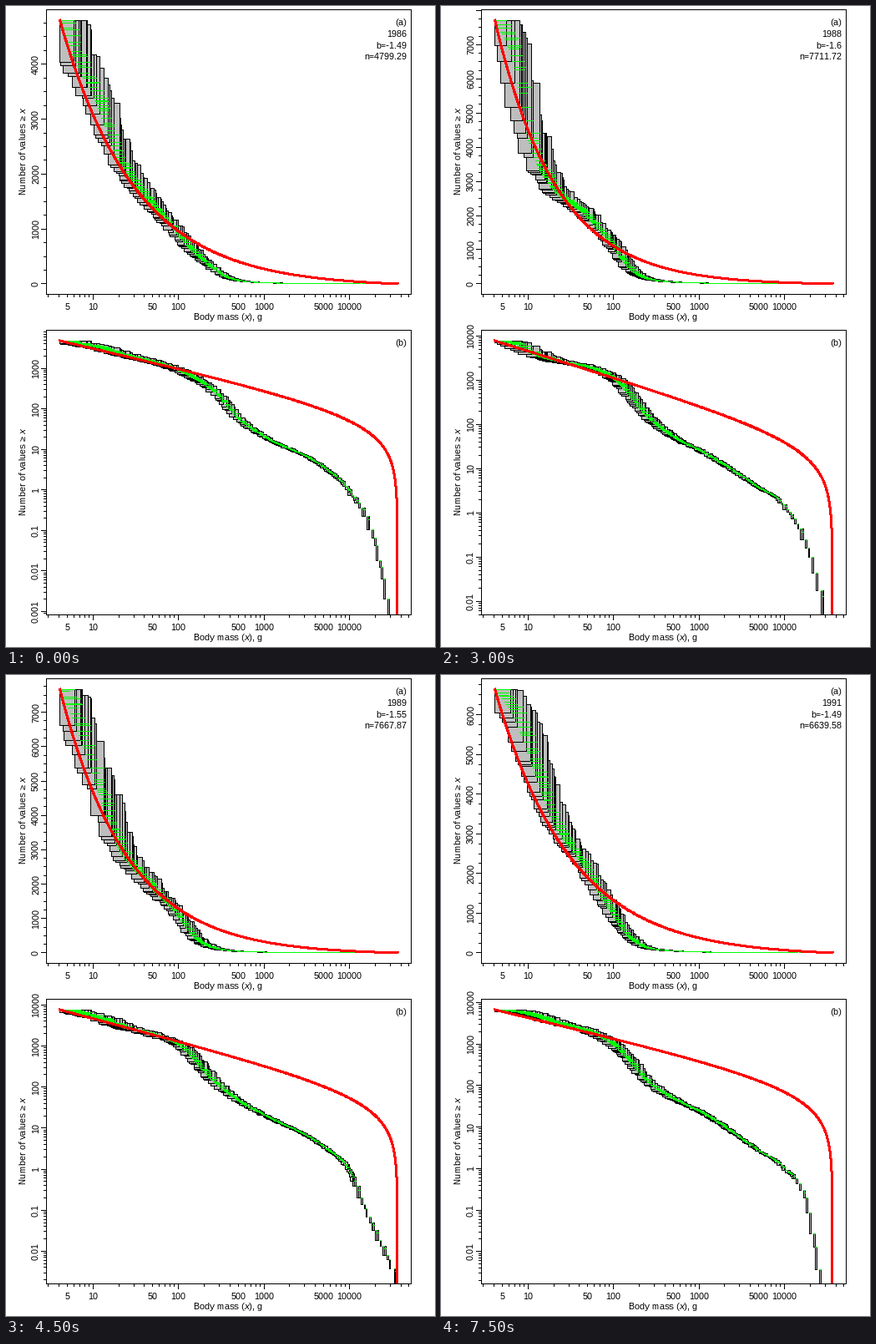
A matplotlib script for the animation above (8000 ms loop, 514 by 768 pixels).

```python
import numpy as np
import matplotlib.pyplot as plt
from matplotlib.animation import FuncAnimation
from matplotlib.collections import LineCollection, PolyCollection
from matplotlib.patches import Rectangle

plt.rcParams.update({
    "font.family": "Liberation Sans",
    "mathtext.fontset": "custom",
    "mathtext.rm": "Liberation Sans",
    "mathtext.it": "Liberation Sans:italic",
    "text.hinting": "default",
    "text.hinting_factor": 1,
    "path.snap": False,
})

W, H, DPI = 514, 768, 100
PX = 72 / DPI                      # one pixel in points
LEFT, RIGHT = 48.5, 485.5
TOP_A, BOT_A = 4.5, 345.5
TOP_B, BOT_B = 388.5, 729.5
SPAN = 315.7                       # height from the lowest to the highest count
FIRST, LAST = 64.6, 469.0          # smallest and largest body mass, in pixels
DECADE = 102.4
HALF = .006                        # half width of the interval of b

# Key points of the number of values >= x; the last one lies at the year's end
KEYS = (FIRST, 86, 108, 135, 175, 206, 250, 280, 310, 380, 410, 442)
YEARS = {   # b, end, counts
    1986: (-1.49, 459, (4799.29, 3950, 3300, 2225, 1400, 870, 244, 51, 19.8,
                        3.6, 1, .058, .0015)),
    1987: (-1.53, 453, (6202.85, 5080, 4060, 3090, 1750, 900, 170, 57, 19,
                        4.4, 1.25, .058, .0026)),
    1988: (-1.6, 460, (7711.72, 6490, 3920, 2720, 1930, 1060, 124, 48, 24.9,
                       3.7, 1.54, .13, .0085)),
    1989: (-1.55, 468, (7667.87, 6430, 4870, 3020, 1850, 1050, 125, 43, 20,
                        3.5, 1, .033, .0029)),
    1990: (-1.52, 467, (6399.75, 5325, 4005, 3130, 1950, 820, 106, 30, 13.9,
                        3.6, 1.02, .073, .011)),
    1991: (-1.49, 454, (6639.58, 5990, 4785, 3250, 2000, 930, 107, 45, 23,
                        2.7, 1.03, .08, .003)),
}

fig = plt.figure(figsize=(W / DPI, H / DPI), dpi=DPI, facecolor="white")
ax = fig.add_axes([0, 0, 1, 1])
ax.set_xlim(0, W)
ax.set_ylim(H, 0)
ax.axis("off")


def snap(v):
    return np.floor(v) + .5


def mass_x(mass):
    return 104.2 + DECADE * (np.log10(mass) - 1)


def x_mass(x):
    return 10 ** (1 + (x - 104.2) / DECADE)


def linear_y(count, n):
    return 332.9 - SPAN * count / n


def log_y(count, n, lowest):
    drop = np.log10(n / np.maximum(count, 1e-7))
    return 401.1 + SPAN * drop / np.log10(n / lowest)


def smooth(x, xs, ys):
    """Cubic Hermite curve through the key points, never rising."""
    xs, ys = np.array(xs), np.array(ys)
    slope = np.gradient(ys, xs)
    i = np.clip(np.searchsorted(xs, x, "right") - 1, 0, len(xs) - 2)
    h = xs[i + 1] - xs[i]
    t = (x - xs[i]) / h
    y = (ys[i] * (1 + 2 * t) * (1 - t) ** 2 + ys[i + 1] * t * t * (3 - 2 * t)
         + h * t * (1 - t) * (slope[i] * (1 - t) - slope[i + 1] * t))
    return np.minimum.accumulate(y)


def label(x, y, s, ha="center", rot=0):
    return ax.text(x, y, s, fontsize=11 * PX, ha=ha, va="baseline",
                   rotation=rot, rotation_mode="anchor", zorder=6)


def add_lines(segs, color, z, clip=None):
    lines = LineCollection(segs, colors=color, linewidths=PX,
                           antialiaseds=False, zorder=z)
    lines.set_snap(False)
    ax.add_collection(lines)
    if clip is not None:
        lines.set_clip_path(clip)
    return lines


def frame(top, bottom):
    box = Rectangle((LEFT, top), RIGHT - LEFT, bottom - top, fill=False,
                    ec="black", lw=PX, antialiased=False, joinstyle="miter",
                    snap=False, zorder=5)
    return ax.add_patch(box)


def x_axis(bottom):
    ticks = []
    for power in range(5):
        for k in range(1, 10):
            x = snap(mass_x(k * 10.0 ** power))
            if not LEFT < x < RIGHT:
                continue
            size = 6 if k == 1 else 3
            ticks.append([(x, bottom), (x, bottom + size + .5)])
            if k in (1, 5) and x < LAST:
                label(x, bottom + 18.5, str(k * 10 ** power))
    add_lines(ticks, "black", 5)
    label(266, bottom + 30.5, "Body mass ($x$), g")


def y_tick(y, size):
    return [(LEFT - size - .5, snap(y)), (LEFT, snap(y))]


def y_axes(n, lowest):
    ticks, out = [], []
    for count in np.arange(0, n * 1.04, 250):
        big = count % 1000 == 0
        y = linear_y(count, n)
        ticks.append(y_tick(y, 6 if big else 3))
        if big and count < n:
            out.append(label(39, y, f"{count:.0f}", rot=90))
    for power in range(-4, 5):
        for k in range(1, 10):
            y = log_y(k * 10.0 ** power, n, lowest)
            if TOP_B < y < BOT_B:
                ticks.append(y_tick(y, 6 if k == 1 else 3))
                if k == 1:
                    out.append(label(39, y, f"{10.0 ** power:g}", rot=90))
    return out + [add_lines(ticks, "black", 5)]


def make_bins(year):
    """Left and right edges with the low, middle and high count of each bin."""
    _, end, counts = YEARS[year]
    rng = np.random.default_rng(year)
    left, x = [], FIRST
    while x < end:
        left.append(x)
        gap = 2.0 if x < 104 else 1.2 + .05 * max(0, x - 400)
        x += gap * rng.uniform(.3, 1.7)
    left = np.array(left)
    width = 18 * 10 ** (-(left - FIRST) / DECADE / 4)
    right = left + width * rng.uniform(.6, 1.15, len(left))

    middle = 10 ** smooth(left, KEYS + (end,), np.log10(counts))
    number = middle - np.append(middle[1:], 0)
    low = ((left[None, :] >= right[:, None]) * number).sum(1)
    high = ((right[None, :] > left[:, None]) * number).sum(1)
    return left, right, low, middle, high


def draw_bins(bins, to_y, clip):
    left, right, low, middle, high = bins
    x0, x1 = snap(left), snap(right)
    y0, y1, ym = (snap(to_y(v)) for v in (low, high, middle))
    boxes = [[(a, c), (b, c), (b, d), (a, d)]
             for a, b, c, d in zip(x0, x1, y0, y1)][::-1]
    poly = PolyCollection(boxes, facecolors="#bebebe", edgecolors="black",
                          linewidths=PX, antialiaseds=False, zorder=1)
    poly.set_joinstyle("miter")
    poly.set_snap(False)
    ax.add_collection(poly)
    poly.set_clip_path(clip)
    segs = [[(a, y), (b, y)] for a, b, y in zip(x0, x1, ym)]
    return [poly, add_lines(segs, "#00ff00", 2, clip)]


def draw_model(b, n, to_y, clip, width, style="-"):
    x = np.linspace(FIRST, LAST, 1200)
    power = x_mass(x) ** (b + 1)
    count = n * (power - power[-1]) / (power[0] - power[-1])
    line, = ax.plot(x, to_y(count), color="red", lw=width * PX, ls=style,
                    antialiased=False, dash_capstyle="butt", zorder=3)
    line.set_clip_path(clip)
    return line


def draw_year(year):
    b, _, counts = YEARS[year]
    n, lowest = counts[0], counts[-1]
    bins = make_bins(year)
    panels = [(lambda c: linear_y(c, n), box_a),
              (lambda c: log_y(c, n, lowest), box_b)]
    out = y_axes(n, lowest)
    for to_y, clip in panels:
        out += draw_bins(bins, to_y, clip)
        out.append(draw_model(b, n, to_y, clip, 2))
        for side in (-HALF, HALF):
            out.append(draw_model(b + side, n, to_y, clip, 1, (0, (4, 4))))
    notes = (str(year), f"b={b:g}", f"n={n:.2f}")
    for y, s in zip((37, 51, 64), notes):
        out.append(label(480, y, s, ha="right"))
    return out


box_a, box_b = frame(TOP_A, BOT_A), frame(TOP_B, BOT_B)
for top, bottom, name in ((TOP_A, BOT_A, "(a)"), (TOP_B, BOT_B, "(b)")):
    x_axis(bottom)
    label(24, (top + bottom) / 2 - 1, "Number of values ≥ $x$", rot=90)
    label(480, top + 18.5, name, ha="right")

groups = [draw_year(year) for year in YEARS]


def update(i):
    for k, group in enumerate(groups):
        for artist in group:
            artist.set_visible(k == i // 3)
    return []


anim = FuncAnimation(fig, update, frames=16, interval=500,
                     init_func=lambda: update(0), repeat=True, repeat_delay=0)
plt.show()
```
